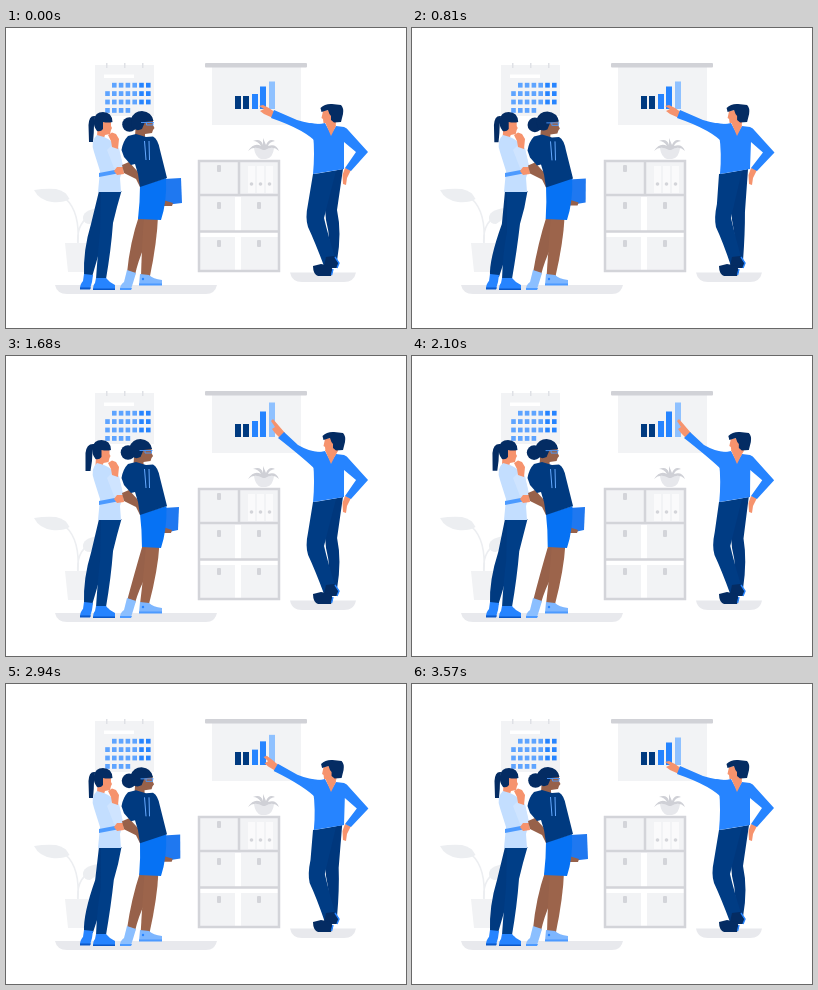
These frames come from a looping animation (400 px wide and 300 px high, 3600 ms). An HTML page:

```html
<!DOCTYPE html>
<html lang="en">
<head>
<meta charset="utf-8">
<title>Team presentation</title>
<style>
html, body { margin: 0; width: 100%; height: 100%; overflow: hidden; background: #fff; }
svg { display: block; width: 100vw; height: 100vh; }
.skin { fill: #f6936d; }
.brown { fill: #97614a; }
.hair { fill: #042c63; }
</style>
</head>
<body>
<svg id="stage" viewBox="0 0 400 300" xmlns="http://www.w3.org/2000/svg">
  <g id="room"></g>
  <g id="chart"></g>

  <g id="listenerA">
    <path id="aLegBack" fill="#003a80"/>
    <path id="aLegFront" fill="#003e87"/>
    <path fill="#2684ff" d="M78 246 L87 247 L86 254 L84 261 H74 Q74 256 77 253Z"/>
    <path fill="#2684ff" d="M90 250 L100 250 Q104 255 109 257 V262 H87 Q87 257 89 255Z"/>
    <path fill="#0a58c8" d="M74 259.500 H85 L84 261.500 H74Z M87 260.500 H109 V262 H87Z"/>
    <g id="aTop">
      <g id="aHead">
        <path id="tail" class="hair"/>
        <path class="skin" d="M92 91 L105 93 L105 98 L106 100 L105 102 L104 106 L99 107 L98 110 L91 109Z"/>
        <path class="hair" d="M88 92 Q89 84 97 84 Q106 84 106.500 94 Q102 95 97 94 L97 101 Q95 104 91 103 Q87 98 88 92Z"/>
      </g>
      <path fill="#c3deff" d="M91 107 L98 109 Q108 113 113 122 L117 139 L114 150 L115 164 L92 164 L94 143 L88 124 Q84 113 91 107Z"/>
      <path fill="#4c9aff" d="M93 145 L114 141 V145 L93 149Z"/>
      <path fill="#cfe4ff" d="M101 122 L106 117 L113 120 L117 138 L113 142 L108 140Z"/>
      <path class="skin" d="M102 107 L106 104.500 L110 106 L113 111 L112 121 L106 119 L105 113Z"/>
      <path class="skin" d="M117 139 L111 139 L108 143 L111 147 L118 146Z"/>
    </g>
  </g>

  <g id="listenerB">
    <path id="bLegBack" class="brown"/>
    <path id="bLegFront" fill="#9c644b"/>
    <path fill="#8bbfff" d="M121 242 L130 245 L127 255 L125 261 H114 Q114 257 118 254Z"/>
    <path fill="#7db6ff" d="M134 246 L143 247 Q147 251 156 252 V257 H133Z"/>
    <path fill="#4c9aff" d="M114 260 H126 L125 262 H114Z M133 255.500 H156 V257.500 H133Z"/>
    <circle cx="137" cy="251" r="1.2" fill="#2684ff"/>
    <path id="board" fill="#1f78f0"/>
    <path id="boardHand" class="brown"/>
    <path id="skirt" fill="#0672f4"/>
    <g id="bTop">
      <g id="bHead">
        <path class="brown" d="M130 94 L147 92 L147 97 L148.500 100 L147 102 L146 105 L139 106 L139 110 L129 108Z"/>
        <circle cx="123.500" cy="96.500" r="7.3" class="hair"/>
        <path class="hair" d="M125 91 Q128 83 136 83 Q146 84 147.500 93 L139 94 L136 101 Q130 104 126 99Z"/>
        <path fill="none" stroke="#4c9aff" stroke-width=".9" d="M135 94.500 H148 M140.500 94.500 V97 H147 V94.500"/>
      </g>
      <path class="brown" d="M116 137 L123 134 L133 145 L136 157 L134 159 L130 151 L118 145Z"/>
      <path fill="#003a80" d="M122 108 L130 106 L140 109 L147 108.500 Q152 111 154 122 L161 150 L134 159 L132 146 L129 136 L125 137 L118 129 L115.500 122 Q117 113 122 108Z"/>
      <path fill="none" stroke="#65a9ff" stroke-width="1" d="M138.500 113 L140 132 M143 113 L143.500 132"/>
    </g>
  </g>

  <g id="speaker">
    <path id="sLegBack" fill="#00377c"/>
    <path id="sLegFront" fill="#003c84"/>
    <path class="hair" d="M320 229 L328 228 L333 235 L331 240 L324 240 L318 238Z"/>
    <path class="hair" d="M315 236 L325 238 L327 243 L325 248 H312 Q307 246 307 238Z"/>
    <path fill="none" stroke="#2684ff" stroke-width="1.4" d="M329 229 L333 235 L331 240 M327 241 L325.500 247"/>
    <path id="hand" class="skin"/>
    <path id="sleeve" fill="#2684ff"/>
    <path class="skin" d="M345 142 L341 150 L340 157 L337 156 L336.500 147 L339 140Z"/>
    <path id="shirt" fill="#2684ff"/>
    <path class="skin" d="M319 94 L329 92 L330 98 L325 108 Z"/>
    <g id="sHead">
      <path class="skin" d="M317 83 L328 81 L330 95 L327 100 L321 98 L321 95 L317.500 95 L317 91 L315.500 90Z"/>
      <path class="hair" d="M314.500 80 Q319 75.500 326 76 L335 77 Q338 80 337 86 L335 94 L328 94.500 L325 92 L325 88 Q323 86 322 82 L315.500 84Z"/>
    </g>
  </g>
</svg>
<script>
const LOOP = 3600;
const el = id => document.getElementById(id);
const rect = (x, y, w, h, fill, rx = 0) =>
  `<rect x="${x}" y="${y}" width="${w}" height="${h}" rx="${rx}" fill="${fill}"/>`;
const path = (d, fill, extra = '') => `<path d="${d}" fill="${fill}" ${extra}/>`;

function plant() {
  const line = 'stroke="#eceef1" stroke-width="1.6"';
  return path('M72 216 Q74 184 60 171 M72 216 Q70 198 82 189', 'none', line) +
    path('M28 162 Q40 160 50 161 Q60 163 63.500 171 Q57 175 46 174 Q33 172 28 162Z', '#eceef1') +
    path('M77 191 Q76 182 93 180 Q95 190 84 196 Q78 196 77 191Z', '#eceef1') +
    path('M59 215 H83 L81 244 H62Z', '#f1f2f4');
}

function calendar() {
  let s = rect(89, 37, 59, 51, '#f2f3f5') + rect(98, 46.5, 30, 3.5, '#fff');
  for (const x of [100, 118, 136]) s += rect(x, 35, 1.5, 5, '#dfe1e6');
  for (let r = 0; r < 4; r++)
    for (let c = r ? 0 : 1; c < (r < 3 ? 7 : 4); c++)
      s += rect(99.2 + c * 6.8, 54.8 + r * 8.4, 4.6, 4.8, c > 4 ? '#2684ff' : '#5ea4ff');
  return s;
}

function shelf() {
  const grey = '#d3d4d9';
  let s = rect(193, 133, 80, 110, '#f2f3f5') + rect(193, 204, 80, 5, '#fff');
  for (const y of [169, 207]) s += rect(229, y, 6, 35, '#fff');
  for (const x of [242, 251, 260])
    s += rect(x, 138, 7, 27, '#fafafb') + `<circle cx="${x + 3.5}" cy="156" r="1.8" fill="${grey}"/>`;
  for (const [x, y] of [[211, 137], [211, 174], [251, 174], [211, 212], [251, 212]])
    s += rect(x, y, 4, 7, grey, 1);
  return s + path('M193 133 H273 V243 H193Z M193 167 H273 M193 203.500 H273 M233 133 V167',
    'none', `stroke="${grey}" stroke-width="2.5"`);
}

function succulent() {
  return path('M248 120 H268 Q267 130 260 131 H255 Q249 129 248 120Z', '#e7e8ec') +
    path('M257 122 Q248 117 242 123 Q248 114 255 118 Q252 113 247 113 Q255 110 257 117 ' +
      'L257 110 L260 117 Q263 110 269 113 Q263 114 262 118 Q270 115 273 123 Q267 117 259 122Z', '#cfd0d6');
}

el('room').innerHTML =
  path('M49 257 H211 Q209 266 200 266 H61 Q51 266 49 257Z', '#e8e9ed') +
  path('M284 244.500 H350 Q348 254 338 254 H296 Q286 254 284 244.500Z', '#e8e9ed') +
  plant() + calendar() + shelf() + succulent() +
  rect(206, 39, 89, 58, '#f2f3f5') + rect(199, 35, 102, 4.5, '#d1d2d7', 1);

// Blend two paths that share the same commands.
function mix(a, b, k) {
  const ends = b.match(/-?[\d.]+/g);
  let i = 0;
  return a.replace(/-?[\d.]+/g, n => (+n + (ends[i++] - n) * k).toFixed(2));
}

const POSES = {
  hand: ['M270 85 L263 80 L257 77 L253 78 L258 81 L254 83 L258 86 L267 90Z',
         'M279 77 L273 70 L267 63 L265 65 L269 71 L266 73 L269 77 L274 82Z'],
  sleeve: ['M268 82 L291 92 Q304 96 314 96 L312 116 Q300 102 265 90Z',
           'M278 76 L292 89 Q304 96 314 96 L312 116 Q300 104 272 82Z'],
  shirt: ['M304 95 Q312 97 319 95 L325 106 L330 98 L338 99 Q341 100 343 103 L362 124 L345 143 L339 140 L350 124 L338 114 L338 141 L307 146 Q309 125 307 106Z',
          'M304 95 Q312 97 319 95 L325 106 L330 98 L338 99 Q341 100 343 103 L362.500 124.500 L345 143 L339 140 L351 124.500 L339 114 L338 141 L308 146 Q310 125 307 106Z'],
  sLegBack: ['M316 145 L337 141 L331 182 Q336 205 331 233 L321 231 Q326 215 320 192Z',
             'M316 145 L336 141 L333 184 Q333 205 331 233 L321 231 Q325 215 320 192Z'],
  sLegFront: ['M307 146 L330 143 L318 190 Q322 207 329 229 L318 238 Q309 214 302 199 Q299 190 302 176Z',
              'M307 146 L330 143 L319 190 Q323 207 329 229 L319 238 Q311 214 304 199 Q302 190 305 176Z'],
  aLegBack: ['M93 163 L110 163 L101 195 Q96 215 86 249 L78 248 Q77 222 85 196Z',
             'M93 163 L110 163 L102 195 Q98 217 87 249 L78 248 Q77 232 90 196Z'],
  aLegFront: ['M95 163 L115.500 163 Q111 178 107 195 Q105 222 100 251 L90 251 Q92 222 94 204Z',
              'M95 163 L115.500 163 Q113 180 108 196 Q105 222 100 251 L90 251 Q91 222 95 204Z'],
  bLegBack: ['M133 188 L146 188 Q144 207 139 217 Q132 233 129 247 L121 245 Q124 214 133 188Z',
             'M137 188 L149 188 Q146 207 141 218 Q133 233 129 247 L121 245 Q128 219 137 188Z'],
  bLegFront: ['M138 188 L152 188 Q151 214 144 248 L135 248 Q136 214 138 188Z',
              'M140 188 L153.500 188 Q152 214 143 248 L134 248 Q138 216 140 188Z'],
  skirt: ['M134 158 L160 150 Q161 174 155 192 L132 191 Q134 174 134 158Z',
          'M134 158 L160.500 150 Q161 174 155 192 L136 191 Q136 174 134 158Z'],
  board: ['M158 151 L175 150 L176 175 L159 177Z', 'M157 152 L173 151 L172 174 L158 177Z'],
  boardHand: ['M157 172 L167 175 L166 178 L158 178Z', 'M157 171 L166 174 L165 177 L157 177Z'],
  tail: ['M89 88 Q83 87 82.500 97 L83 114 H87 Q88 104 88 97Z',
         'M90 88 Q82 87 81 97 L81 115 H86 Q88 104 88 95Z']
};

const ease = u => u < .5 ? 4 * u ** 3 : 1 - 4 * (1 - u) ** 3;
const ramp = (t, from, to) => ease(Math.min(1, Math.max(0, (t - from) / (to - from))));
const wave = (t, period) => (1 - Math.cos(2 * Math.PI * t / period)) / 2;

function draw(t) {
  const lift = ramp(t, 740, 1650) - ramp(t, 2430, 3370);
  const sway = wave(t, LOOP);
  const step = wave(t, LOOP / 2);
  const nod = ramp(t, 420, 1500) - ramp(t, 1800, 2500);

  const drive = { hand: lift, sleeve: lift, tail: nod,
    board: Math.min(1, sway * 1.4), boardHand: sway, bLegBack: sway, bLegFront: sway, skirt: sway };
  for (const id in POSES) el(id).setAttribute('d', mix(...POSES[id], drive[id] ?? step));

  const bars = [[229, 68, '#003a80'], [237, 68, '#003a80'], [246, 66 - lift, '#2684ff'],
    [254, 58.5 - 3 * lift, '#2684ff'], [263, 53.5 - 7 * lift, '#8fc1ff']];
  el('chart').innerHTML = bars.map(([x, y, c]) => rect(x, y, 6, 81 - y, c)).join('');

  el('sHead').setAttribute('transform', `translate(${1.5 * lift + .5 * nod} 0)`);
  el('aHead').setAttribute('transform', `translate(${-1.5 * nod} 0)`);
  el('bHead').setAttribute('transform', `translate(${-1.5 * sway} 0)`);
  el('bTop').setAttribute('transform', `translate(0 ${.4 * step})`);
}

const start = performance.now();
function tick() {
  draw((performance.now() - start) % LOOP);
  requestAnimationFrame(tick);
}
draw(0);
requestAnimationFrame(tick);
</script>
</body>
</html>
```
